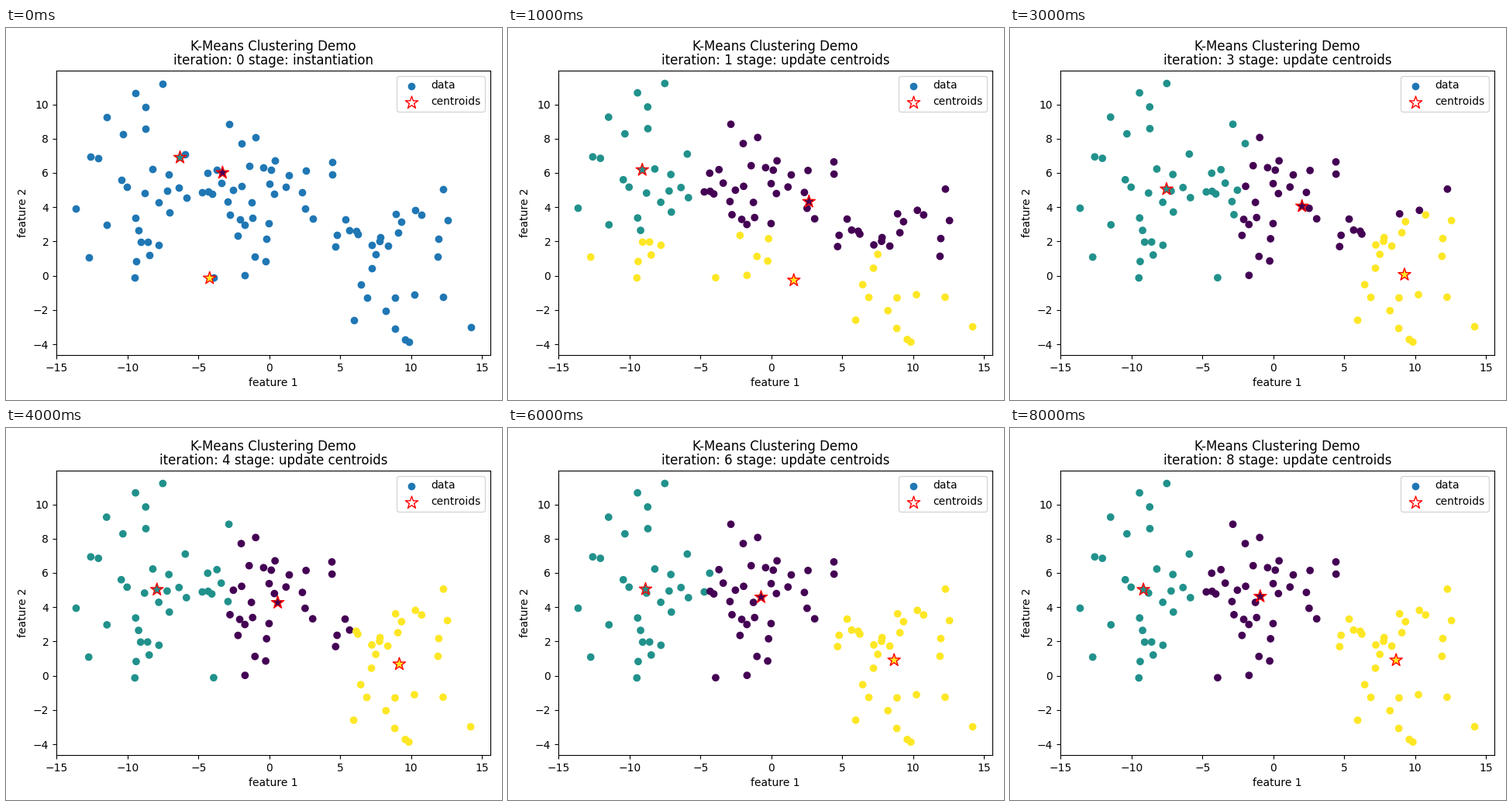
Write a matplotlib script that moves like this. It is 640 px wide and 480 px high and loops after 8.5 s.

```python
import numpy as np
import matplotlib.pyplot as plt
from matplotlib.animation import FuncAnimation

W, H, DPI = 640, 480, 100
LEFT, RIGHT, TOP, BOTTOM = 65, 625, 54.9, 421.9  # plot box in pixels, y down

SAMPLES, CLUSTERS, SPREAD = 100, 3, 2.5
ROUNDS = 8
STEP_MS = 500
START = np.array([(-3.30, 6.01), (-6.30, 6.90), (-4.21, -0.14)])


def make_blobs(seed):
    """Gaussian point clouds around uniformly placed centers."""
    rng = np.random.RandomState(seed)
    centers = rng.uniform(-10, 10, (CLUSTERS, 2))
    base, extra = divmod(SAMPLES, CLUSTERS)
    return np.vstack([rng.normal(center, SPREAD, (base + (k < extra), 2))
                      for k, center in enumerate(centers)])


def nearest(points, centers):
    gaps = points[:, None] - centers[None]
    return (gaps ** 2).sum(axis=2).argmin(axis=1)


def run_kmeans(points, centers):
    """List (iteration, stage, labels, centers) for every step."""
    steps = [(0, "instantiation", None, centers)]
    for i in range(1, ROUNDS + 1):
        labels = nearest(points, centers)
        steps.append((i, "assign labels", labels, centers))
        centers = np.array([points[labels == k].mean(axis=0)
                            for k in range(CLUSTERS)])
        steps.append((i, "update centroids", labels, centers))
    return steps


points = make_blobs(seed=7)
steps = run_kmeans(points, START)
palette = plt.get_cmap("viridis")(np.linspace(0, 1, CLUSTERS))

fig = plt.figure(figsize=(W / DPI, H / DPI), dpi=DPI)
ax = fig.add_axes([LEFT / W, 1 - BOTTOM / H,
                   (RIGHT - LEFT) / W, (BOTTOM - TOP) / H])
dots = ax.scatter(*points.T, c="C0", label="data")
stars = ax.scatter(*START.T, s=150, marker="*", facecolors="white",
                   edgecolors="red", label="centroids")
ax.set(xlabel="feature 1", ylabel="feature 2")
ax.legend(loc="upper right")
stars.set_facecolor(palette)


def draw(frame):
    iteration, stage, labels, centers = steps[frame]
    dots.set_color("C0" if labels is None else palette[labels])
    stars.set_offsets(centers)
    ax.set_title("K-Means Clustering Demo\n"
                 f"iteration: {iteration} stage: {stage}", linespacing=1.0)
    return dots, stars


anim = FuncAnimation(fig, draw, frames=len(steps), interval=STEP_MS,
                     repeat=True, repeat_delay=0)
plt.show()
```
